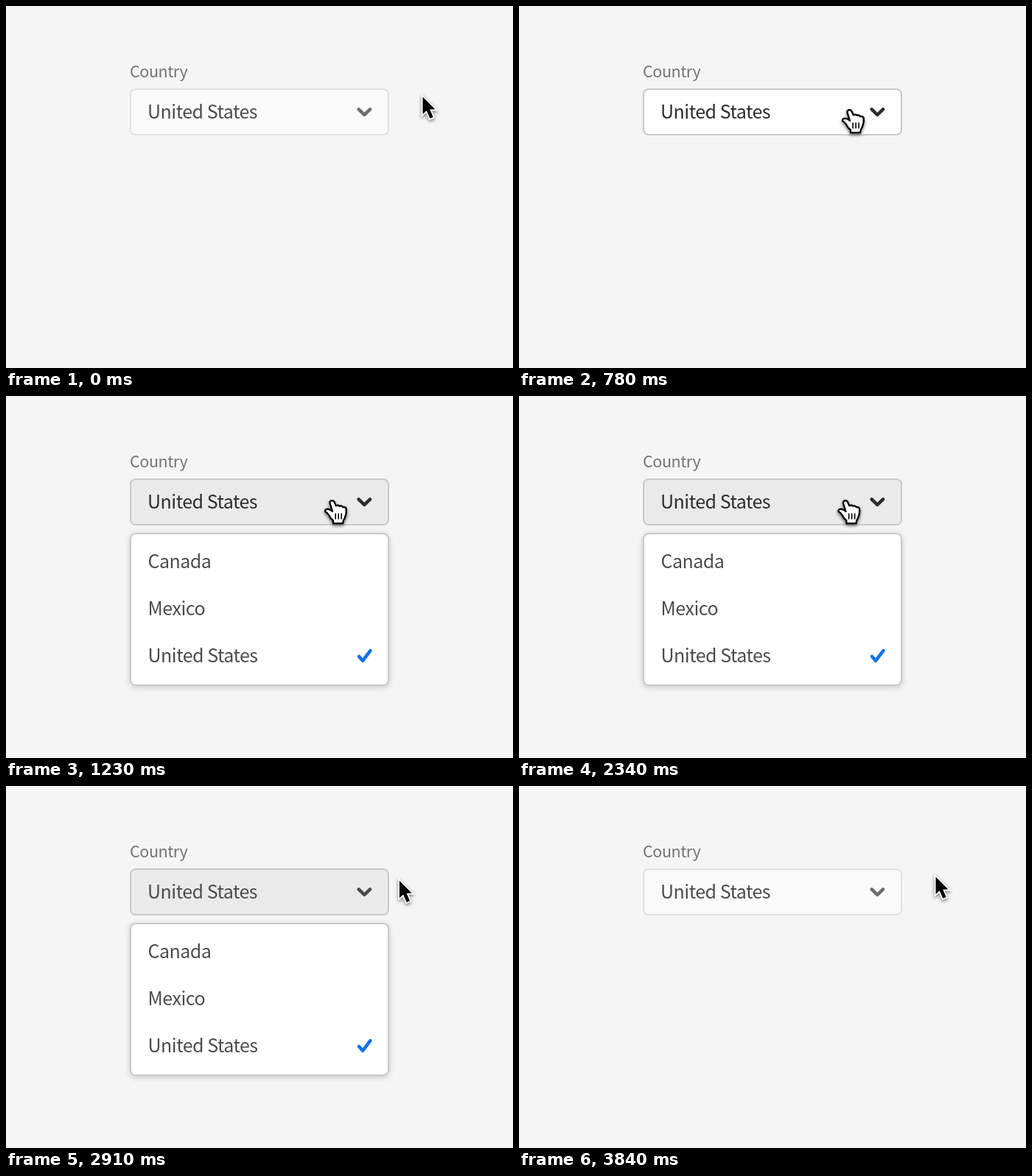
An HTML page with a canvas for the animation above (4.5 s loop, 688 by 492 pixels).

```html
<!DOCTYPE html>
<html lang="en">
<head>
<meta charset="utf-8">
<title>Country picker</title>
<style>
  html, body { margin: 0; width: 100%; height: 100%; overflow: hidden; background: #f5f5f5; }
  canvas { display: block; }
</style>
</head>
<body>
<canvas id="stage" width="688" height="492"></canvas>
<script>
const ctx = document.getElementById('stage').getContext('2d');
const LOOP = 4500, STEP = 30;
const FONT = '"Noto Sans CJK JP", "Noto Sans CJK SC", "Noto Sans", sans-serif';
const REST = { x: 565, y: 122 }, PRESS = { x: 443, y: 142 };

const arrow = new Path2D('M.5 1.5V25L5.7 20.2L10.3 30.8L14.6 29L10.2 18.6H17.4Z');
const hand = new Path2D(
  'M2.6 2.4Q1.2 -.3 -1.3 .4Q-3.9 1.2 -3.2 4L.2 15Q-3 12.4 -6 11.8Q-10 11.8 -9.8 15' +
  'Q-6.6 16.6 -4.6 20Q-2.4 25 1 27V31H14Q14 27.4 16.4 24Q19.2 18 18.6 11.4' +
  'Q17.8 8.6 14.4 9.4Q13 6.8 9.8 7.8Q8 5.8 4.8 7.4Z');
const creases = new Path2D('M4.2 18V25M8.2 18V25M12.2 18V25');
const chevron = new Path2D('M478.6 140.4L486.3 147.8L494 140.4');
const check = new Path2D('M479 354L484 359.8L494.4 346.2');

const clamp = v => Math.max(0, Math.min(1, v));
const smooth = v => { v = clamp(v); return v * v * (3 - 2 * v); };
const span = (t, from, length) => smooth((t - from) / length);
const mix = (a, b, p) => a + (b - a) * p;
const gray = v => `rgb(${v},${v},${v})`;

function shadow(color, blur, dy) {
  ctx.shadowColor = color;
  ctx.shadowBlur = blur;
  ctx.shadowOffsetY = dy;
}

function box(x, y, w, h, fill, line, shaded) {
  ctx.beginPath();
  ctx.roundRect(x, y, w, h, 8);
  if (shaded) shadow('rgba(0,0,0,.18)', 8, 2);
  ctx.fillStyle = line;
  ctx.fill();
  shadow('transparent', 0, 0);
  ctx.beginPath();
  ctx.roundRect(x + 2, y + 2, w - 4, h - 4, 6);
  ctx.fillStyle = fill;
  ctx.fill();
}

function label(text, x, y, size, color) {
  ctx.font = `${size}px ${FONT}`;
  ctx.letterSpacing = `${-size / 50}px`;
  ctx.fillStyle = color;
  ctx.fillText(text, x, y);
}

function stroke(path, color, width) {
  ctx.strokeStyle = color;
  ctx.lineWidth = width;
  ctx.stroke(path);
}

function menu(p) {
  if (p <= 0) return;
  ctx.save();
  ctx.globalAlpha = p;
  ctx.translate(0, -12 * (1 - p));
  box(168, 186, 352, 208, '#fff', '#cacaca', true);
  ['Canada', 'Mexico', 'United States'].forEach((name, i) =>
    label(name, 192.5, 234 + 64 * i, 25, '#4b4b4b'));
  stroke(check, '#1473e6', 4.6);
  ctx.restore();
}

function cursor(x, y, pointing) {
  ctx.save();
  ctx.translate(x, y);
  shadow('rgba(0,0,0,.5)', 4, 2);
  if (pointing) {
    stroke(hand, '#000', 2.4);
    ctx.fillStyle = '#fff';
    ctx.fill(hand);
    shadow('transparent', 0, 0);
    stroke(hand, '#000', 2);
    stroke(creases, '#000', 1.6);
  } else {
    ctx.lineJoin = 'miter';
    stroke(arrow, '#fff', 3.6);
    shadow('transparent', 0, 0);
    ctx.fillStyle = '#000';
    ctx.fill(arrow);
  }
  ctx.restore();
}

function draw(t) {
  const travel = span(t, 0, 900) - span(t, 2310, 900);
  const x = mix(REST.x, PRESS.x, travel), y = mix(REST.y, PRESS.y, travel);
  const pointing = x < 520;
  const hover = t < 2850 ? span(t, 370, 140) : 0;
  const open = span(t, 1060, 150) - span(t, 3725, 115);
  const edge = Math.max(hover, open);

  ctx.fillStyle = '#f5f5f5';
  ctx.fillRect(0, 0, 688, 492);
  label('Country', 168, 97, 21.5, '#747474');
  box(168, 112, 352, 64, gray(mix(mix(250, 255, hover), 234, open)), gray(mix(225, 202, edge)));
  label('United States', 192, 152.5, 25, gray(mix(75, 44, hover)));
  stroke(chevron, gray(mix(mix(110, 75, open), 44, hover)), 4.6);
  menu(open);
  cursor(x, y, pointing);
}

ctx.lineCap = ctx.lineJoin = 'round';
const start = performance.now();
function tick() {
  const t = (performance.now() - start) % LOOP;
  draw(Math.floor(t / STEP) * STEP);
  requestAnimationFrame(tick);
}
tick();
</script>
</body>
</html>
```
